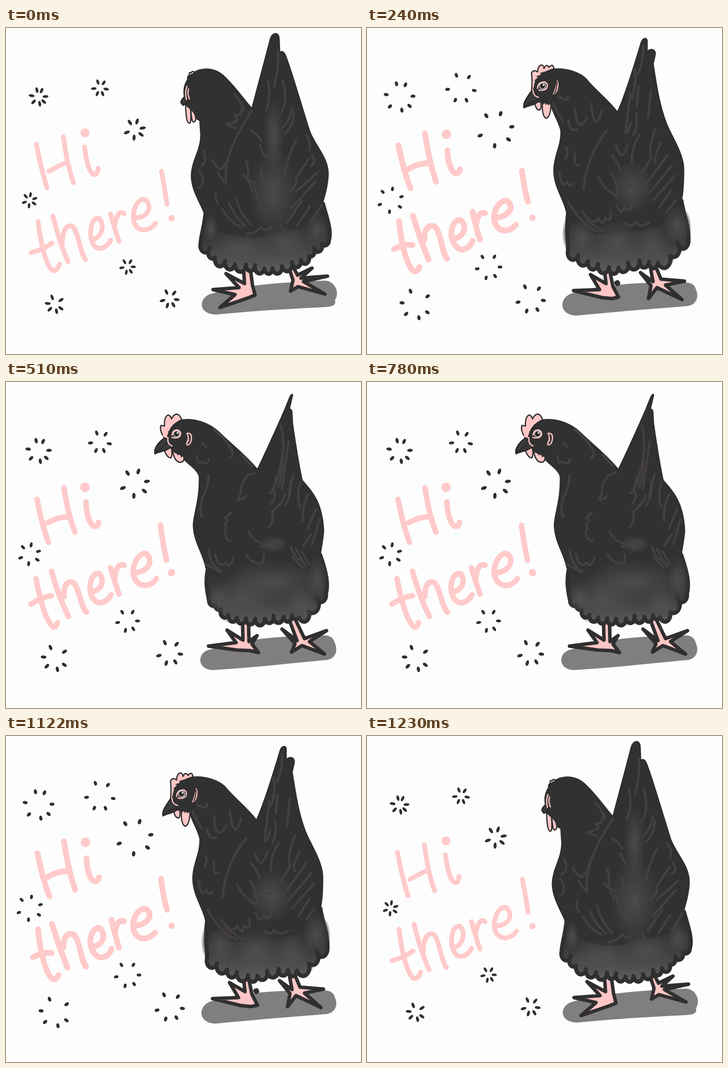
An HTML page that plays this animation: 710 by 653 pixels, repeating every 1440 ms.

```html
<!DOCTYPE html>
<html lang="en">
<head>
<meta charset="utf-8">
<title>Hi there!</title>
<style>
html, body { margin: 0; width: 100%; height: 100%; overflow: hidden; background: #fdfdfd; }
svg { display: block; width: 710px; height: 653px; }
svg * { stroke-linecap: round; stroke-linejoin: round; }
.words { fill: none; stroke: #ffcaca; }
.dot { fill: #ffcaca; }
.burst { fill: #302f2f; }
.shadow { fill: #817e7f; }
.leg { fill: #ffc6c6; stroke: #302f2f; stroke-width: 7; }
.skirt { fill: url(#fade); stroke: #302f2f; stroke-width: 8; }
.body { fill: #323131; stroke: #302f2f; stroke-width: 3; }
.feather { fill: none; stroke: #444041; stroke-width: 4.5; }
.skin { fill: #ffc6c6; stroke: #302f2f; stroke-width: 2.5; }
.beak { fill: #3b3a3a; stroke: #2a2929; stroke-width: 2.5; }
.line { fill: none; stroke: #ffc6c6; stroke-width: 2.5; }
.ink { fill: none; stroke: #2a2929; stroke-width: 2; }
</style>
</head>
<body>
<svg viewBox="0 0 710 653" role="img" aria-label="Hi there! A black hen turns its head">
  <defs>
    <linearGradient id="fade" gradientUnits="userSpaceOnUse" x1="0" y1="375" x2="0" y2="485">
      <stop stop-color="#323131"/><stop offset=".5" stop-color="#3c3b3b"/><stop offset="1" stop-color="#5c5c5c"/>
    </linearGradient>
    <radialGradient id="smoke">
      <stop stop-color="#555252" stop-opacity=".75"/><stop offset="1" stop-color="#555252" stop-opacity="0"/>
    </radialGradient>
    <radialGradient id="fringe">
      <stop offset=".6" stop-color="#777"/><stop offset="1" stop-color="#777" stop-opacity="0"/>
    </radialGradient>
  </defs>
</svg>
<script>
// Each burst: centre, radius in the three poses, petal angles in degrees
const bursts = [
  [65, 138, [14, 27, 21], [-170, -103, -64, -3, 42, 80, 135]],
  [188, 120, [12.5, 27, 19], [174, -110, -54, 11, 66, 115]],
  [257, 203, [16.5, 33, 25], [158, -124, -72, -9, 38, 93]],
  [47, 345, [11, 23, 19], [158, -133, -80, -18, 35, 95]],
  [243, 478, [11.5, 23, 20], [169, -122, -59, 2, 55, 102]],
  [98, 553, [14.5, 28, 23], [-175, -113, -34, 36, 78, 135]],
  [327, 542, [14.5, 26, 22], [164, -115, -50, 8, 58, 107]]
];
const petals = [[5.8, 2.8], [5, 3.2], [5.6, 3.1]];

const poses = [{
  pen: 9.5, dots: [[158, 210, 9], [331, 381, 6.5]],
  words: `M61 233Q70 282 82 320M115 218Q121 270 135 310M86 287Q105 276 123 268
    M157 238C160 262 166 290 175 293C181 296 184 288 184 281
    M64 387C68 422 78 472 92 485C99 489 105 480 107 473M50 450Q73 444 92 431
    M94 377Q107 430 124 468M113 432C112 405 122 393 133 397C145 408 148 450 159 464
    M173 424C193 419 198 394 186 381C170 378 165 412 173 430C183 452 204 438 209 425
    M209 372Q218 405 226 427M217 396C220 379 227 363 236 372
    M258 380C283 380 294 360 279 344C262 338 249 372 257 392C268 412 290 405 299 391
    M311 287Q318 325 322 353`,
  shadow: "M412 532C385 538 382 573 420 574C500 566 580 562 638 559C656 558 660 554 658 545C668 530 658 507 638 506C560 509 480 514 412 532Z",
  legs: `M475 480L477 512L440 492L466 520L414 524L458 534L428 560L486 540L498 535L493 515L488 478Z
    M564 475L574 505L569 527L584 518L638 533L595 508L643 497L590 501L612 481L583 495L572 474Z`,
  skirt: ["M399 370C397 395 390 415 389 432", [408, 440, 418, 460, 438, 467, 458, 473, 480, 474, 498, 475, 517, 482, 533, 481, 552, 477, 572, 469, 590, 465, 606, 457, 616, 441, 632, 432, 646, 425], "C652 405 640 375 634 352Z"],
  body: `M358 140C352 120 362 95 385 85C405 79 425 84 440 101C460 120 478 147 492 162C500 130 518 65 529 22C533 8 546 8 546 22L547 49
    C555 44 558 52 562 64C575 100 592 160 607 207C620 240 645 260 644 295C643 320 637 335 633 350C636 375 634 390 625 398
    C600 385 580 405 550 405C510 425 450 425 403 390C398 360 371 332 371 295C372 265 390 245 390 215L388 185C375 180 362 165 358 140Z`,
  smoke: [[535, 215, 22, 75], [535, 330, 50, 90], [470, 440, 65, 32], [560, 430, 60, 34], [622, 405, 22, 36], [410, 400, 14, 30]],
  fringe: [[618, 438, 15, 18], [480, 472, 60, 14]],
  feathers: `M457 133Q470 148 476 165M470 163Q474 176 457 175L463 184Q458 190 442 192M444 195L461 201
    M491 166Q450 230 442 270Q438 290 440 312M490 205Q504 213 510 225M544 45Q546 80 536 118M524 108Q531 140 520 165
    M553 105Q566 150 548 172M572 160Q568 185 555 198M576 170Q573 198 558 212M580 225Q563 258 558 290
    M606 262L580 300Q584 312 566 330M622 290L580 328M618 308L572 360M592 345L562 390M607 358L582 396M631 355L610 388
    M394 245Q405 266 390 277M386 285Q402 308 387 320M412 265Q430 295 437 272M424 290Q430 302 436 308M420 330Q417 345 425 352
    M480 265Q488 290 482 302L500 312M497 318Q505 355 522 372M510 285Q515 300 508 312M475 295Q490 310 493 328
    M460 340Q468 372 490 394M432 362Q447 390 470 398M447 352Q455 375 478 396M482 412Q500 412 510 398Q520 412 530 398
    M508 235Q512 252 520 258M550 395Q562 420 574 408M600 215Q612 232 606 245M612 255Q622 270 610 276`,
  head: `<path class="skin" d="M363 101Q364 94 367 96Q365 87 370 90Q373 84 376 89Q381 85 384 89Q370 91 363 101Z"/>
    <path class="skin" d="M359 153C360 170 360 190 367 191C372 188 369 170 369 160C371 175 371 190 376 188C382 186 380 172 372 165Z"/>
    <path class="beak" d="M359 136Q349 144 350 150L354 155L362 150Z"/>
    <path class="line" d="M362 117Q357 130 361 143M365 122Q362 132 367 142"/>`
}, {
  pen: 11.5, dots: [[159, 213, 9.5], [331, 380, 6.5]],
  words: `M63 235Q74 290 87 321M116 211Q123 262 138 308M82 283Q105 269 127 271
    M161 245C161 268 169 291 178 291C184 291 185 287 186 283
    M64 387C67 420 77 474 93 487C99 489 103 484 105 479M54 443Q75 432 91 435
    M92 376Q105 420 123 464M115 424C114 402 123 394 134 397C148 405 149 450 160 462
    M173 422C194 420 202 396 187 385C171 382 162 414 175 433C188 454 207 440 211 426
    M211 368Q218 400 226 424M218 394Q222 366 236 371
    M256 380C281 380 297 359 281 347C264 341 246 374 258 395C270 413 289 405 298 394
    M310 286Q315 325 322 348`,
  shadow: "M412 531C383 538 382 576 420 576C500 568 580 562 640 557C660 555 664 537 658 524C654 508 640 510 625 509C560 510 480 511 412 531Z",
  legs: `M475 484L478 512L447 494L465 524L413 526L470 540L490 542L503 539L492 518L485 484Z
    M566 475L572 508L547 490L568 516L563 542L580 520L630 544L597 515L635 507L588 503L575 472Z
    M498 510Q502 506 503 512Q500 516 498 510Z`,
  skirt: ["M402 372C398 400 402 420 402 445", [422, 455, 442, 467, 462, 473, 484, 479, 503, 480, 522, 470, 545, 466, 564, 468, 582, 470, 606, 456, 620, 428, 643, 425], "C645 400 632 370 629 346Z"],
  body: `M331 126C333 110 345 92 372 83C395 80 428 88 442 107C460 128 480 142 501 169C515 140 535 75 549 28C553 19 561 19 560 28L560 49
    C567 39 578 43 576 54L572 72C578 110 585 165 605 206C620 235 634 262 633 285C633 310 632 335 627 350C632 372 622 385 605 385
    C570 405 500 410 460 412C435 408 415 390 400 372C396 345 374 320 374 285C374 255 390 235 388 205C385 190 375 175 370 160C357 152 342 148 333 140Z`,
  smoke: [[530, 320, 45, 55], [500, 430, 55, 45], [430, 420, 30, 40], [570, 435, 38, 40], [620, 395, 28, 42]],
  fringe: [[405, 412, 15, 38], [635, 400, 14, 35], [600, 460, 16, 18], [500, 477, 65, 12]],
  feathers: `M384 122Q377 142 390 140Q402 148 402 136M372 150Q380 168 392 186M402 185Q406 210 420 203M416 160Q420 215 440 180
    M448 152Q456 215 470 165M480 205Q440 255 433 322M416 250Q413 280 424 274M398 240Q406 250 396 262M385 290Q390 325 400 308Q403 320 413 312
    M552 35Q554 65 542 92M535 82Q540 110 530 140M543 118L540 155M527 130L517 210Q522 215 528 190M538 170Q543 190 533 215
    M568 125L562 180M498 235Q510 275 522 232M490 255Q505 275 507 285M545 215Q528 240 530 270M578 200Q562 235 568 262L550 290
    M588 230Q570 265 578 270M600 255Q580 285 552 320M610 275L565 330M616 296L572 345M608 325L585 360M617 345L600 368
    M462 298Q477 325 500 338Q505 315 488 290M500 355Q508 380 514 358Q524 375 532 350M522 312Q530 320 537 310
    M403 348Q430 396 462 408M430 368Q455 400 462 380Q474 402 476 380Q490 392 487 366M440 385L470 406
    M516 390Q530 402 536 388Q548 402 564 390`,
  head: `<path class="skin" d="M329 126Q331 105 329 90Q333 82 341 88Q342 74 350 74Q354 76 354 81Q359 70 364 79Q372 69 374 82Q345 90 337 108L332 128Z"/>
    <path class="ink" d="M336 105l6 -4M340 97l9 -2M347 91l10 -3"/>
    <path class="skin" d="M335 148Q338 166 346 164Q350 158 347 148Z"/>
    <path class="skin" d="M351 147Q349 178 359 181Q368 176 368 150Z"/>
    <path class="ink" d="M350 144l3 8M356 145l2 8M362 145l1 9"/>
    <path class="body" d="M333 128Q342 100 372 95L382 130L368 152Q350 150 340 143Z"/>
    <path class="beak" d="M329 126C321 138 311 150 314 160C325 154 336 155 344 146L337 132Z"/><path class="ink" d="M316 157Q330 146 341 145"/>
    <path class="line" d="M332 125Q333 137 343 139M341 121Q342 108 355 108Q364 112 359 121Q352 127 344 124"/>
    <circle cx="351" cy="116" r="6" fill="#2a2929" stroke="#ddd" stroke-width="1.5"/><circle cx="353" cy="114" r="1.8" fill="#fff"/>
    <path class="skin" d="M379 101Q388 108 382 126Q377 137 370 133Q377 118 379 101Z"/><path class="ink" d="M380 108Q380 122 375 131"/>`
}, {
  pen: 11, dots: [[158, 211, 9.5], [331, 382, 7.5]],
  words: `M62 235Q72 287 85 321M116 212Q124 266 138 301M83 282Q106 269 127 270
    M160 240C160 264 168 288 177 289C183 290 184 286 185 281
    M60 394C67 430 79 480 95 491C100 491 102 486 103 482M50 445Q71 431 91 428
    M91 379Q105 430 125 470M116 430C115 405 124 397 135 402C147 414 149 450 161 461
    M172 420C191 418 198 396 187 384C171 380 163 410 172 430C183 452 204 440 210 426
    M209 372Q218 402 226 425M217 395Q221 361 236 367
    M257 382C281 382 297 360 281 344C264 339 248 373 257 393C268 415 291 409 301 394
    M309 287Q314 325 321 357`,
  shadow: "M408 536C382 540 380 577 415 577C500 572 580 562 640 557C660 555 664 537 658 524C654 506 640 507 625 508C560 509 480 512 408 536Z",
  legs: `M473 480L474 517L442 497L460 522L405 529L462 537L488 538L505 542L492 525L502 508L486 520L485 480Z
    M566 475L582 518L552 495L578 524L571 541L592 528L637 545L607 520L641 498L597 514L577 472Z`,
  skirt: ["M404 372C398 400 402 418 406 438", [418, 447, 430, 455, 445, 466, 462, 471, 480, 473, 498, 474, 518, 474, 535, 468, 555, 470, 572, 467, 586, 471, 606, 460, 620, 430, 640, 424], "C647 400 635 365 628 345Z"],
  body: `M318 116C328 100 335 82 353 76C378 73 405 82 425 100C450 125 478 145 503 176C520 140 545 85 558 55L568 30C572 23 574 24 572 30L566 56
    C574 50 571 70 573 85C578 120 585 165 592 197C612 220 632 240 635 298C633 320 630 335 627 350C622 375 600 380 580 375
    C540 385 490 372 455 385C430 385 412 385 400 372C396 345 375 320 375 285C377 260 388 235 387 190C384 175 365 165 358 156C340 152 327 140 324 125Z`,
  smoke: [[530, 400, 100, 45], [470, 435, 60, 42], [590, 445, 35, 34], [622, 395, 22, 48], [425, 432, 24, 30], [535, 325, 30, 18]],
  fringe: [[500, 476, 70, 12], [600, 455, 15, 22]],
  feathers: `M382 148Q380 165 392 160Q405 168 405 155M392 122L400 130M415 95Q440 115 447 130M447 128Q460 148 447 152M470 145L492 168
    M405 187Q405 212 391 235M393 235Q385 255 392 270M498 182L483 187Q468 205 470 222L464 236Q475 236 480 228
    M450 262L438 272Q447 275 438 285Q443 295 437 300Q441 320 451 318
    M550 88Q560 130 548 172L540 205M553 140Q555 180 545 210M565 120L552 215M575 185L565 225M527 222Q535 225 540 190
    M530 245Q545 225 532 215M535 258Q555 240 558 225M525 290Q535 285 533 260M568 200Q572 225 558 248M590 200Q580 225 588 250
    M605 225Q592 245 594 278M620 255L603 295M627 275L612 325M610 305L595 328M485 300Q495 318 512 323M510 330L550 320
    M540 328L549 322M480 345Q495 368 515 362L516 345M570 330Q580 360 590 355M580 335L600 370M592 340L605 365
    M405 335Q410 370 430 378M418 345Q425 375 440 362Q448 375 455 352M400 365L430 382M572 350L595 373`,
  head: `<path class="skin" d="M317 113Q306 96 310 87L317 88Q316 70 324 66Q329 67 331 74Q337 62 344 65Q350 69 351 76Q332 85 327 99L321 114Z"/>
    <path class="ink" d="M325 100l6 -2M330 93l8 -1M335 86l10 -1"/>
    <path class="skin" d="M317 138Q323 153 330 152Q334 143 330 130Z"/>
    <path class="skin" d="M333 136Q336 160 349 161Q357 160 356 150Z"/>
    <path class="ink" d="M333 133l4 8M341 138l3 8M349 143l2 7"/>
    <path class="body" d="M323 120Q330 96 350 90L360 125L354 146Q338 144 330 132Z"/>
    <path class="beak" d="M319 111C305 119 295 134 298 144C306 139 318 140 331 130L326 120Z"/><path class="ink" d="M299 141Q313 133 322 122"/>
    <path class="line" d="M314 108L324 112Q322 124 332 128M332 106Q334 95 343 96Q352 100 348 108Q342 114 332 111"/>
    <circle cx="341" cy="104" r="6" fill="#2a2929" stroke="#ddd" stroke-width="1.5"/><circle cx="343" cy="102" r="1.8" fill="#fff"/>
    <path class="line" d="M362 103Q371 101 371 112Q370 126 362 126Q360 122 365 117M362 103Q367 112 363 119"/>`
}];

const path = (cls, d) => `<path class="${cls}" d="${d}"/>`;
const ovals = (list, fill) => list.map(([x, y, rx, ry]) =>
  `<ellipse cx="${x}" cy="${y}" rx="${rx}" ry="${ry}" fill="url(#${fill})"/>`).join("");

const drawBursts = p => bursts.map(([x, y, radii, angles]) => {
  const size = 0.55 + radii[0] / 31, [rx, ry] = petals[p];
  return angles.map(a => `<ellipse class="burst" transform="translate(${x} ${y}) rotate(${a})"
    cx="${radii[p]}" rx="${rx * size}" ry="${ry * size}"/>`).join("");
}).join("");

// Hem of rounded feather tips between successive points
function skirtPath([start, pts, end]) {
  let d = start;
  for (let i = 0; i < pts.length; i += 2) d += `A8 11 0 0 0 ${pts[i]} ${pts[i + 1]}`;
  return d + end;
}

const drawPose = (o, p) => "<g>" + drawBursts(p)
  + `<g stroke-width="${o.pen}">${path("words", o.words)}</g>`
  + o.dots.map(([x, y, r]) => `<circle class="dot" cx="${x}" cy="${y}" r="${r}"/>`).join("")
  + path("shadow", o.shadow) + path("leg", o.legs) + ovals(o.fringe, "fringe")
  + path("skirt", skirtPath(o.skirt)) + path("body", o.body)
  + ovals(o.smoke, "smoke") + path("feather", o.feathers) + o.head + "</g>";

const svg = document.querySelector("svg");
svg.insertAdjacentHTML("beforeend", poses.map(drawPose).join(""));
const groups = [...svg.children].slice(1);

const poseAt = t => t < 240 || t >= 1230 ? 0 : t < 510 || t >= 960 ? 1 : 2;
const begin = performance.now();
function tick() {
  const now = poseAt((performance.now() - begin) % 1440);
  groups.forEach((g, i) => g.style.display = i === now ? "" : "none");
  requestAnimationFrame(tick);
}
tick();
</script>
</body>
</html>
```
